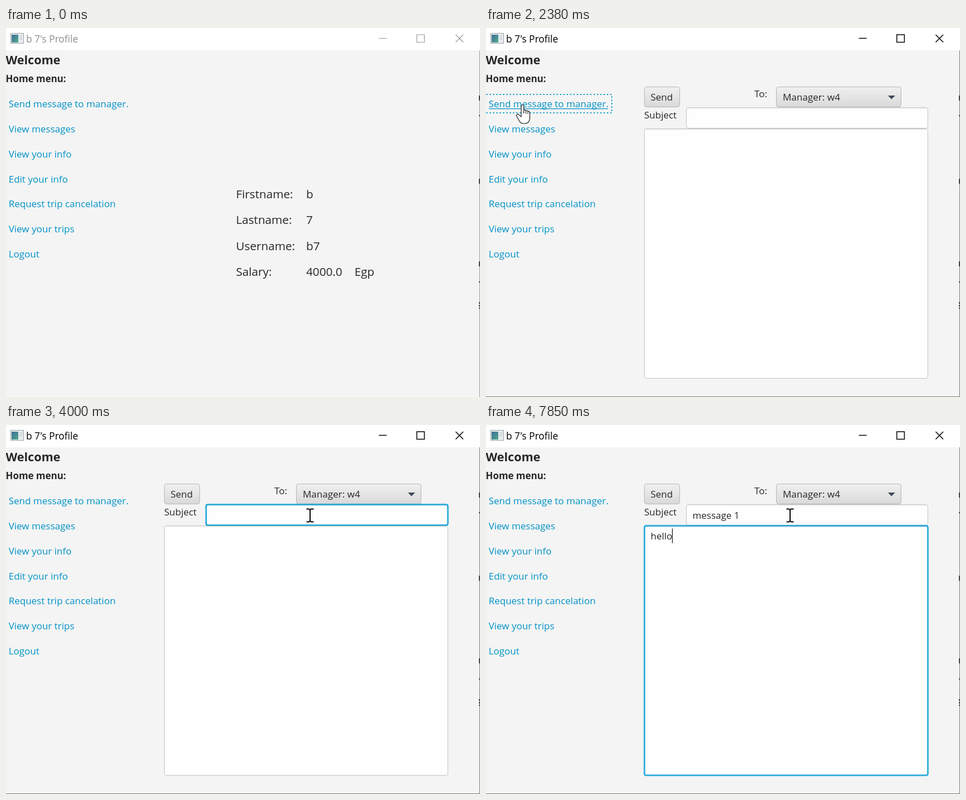
An HTML page that plays this animation: 848 px wide and 661 px high, repeating every 8000 ms.

```html
<!DOCTYPE html>
<html lang="en">
<head>
<meta charset="utf-8">
<title>Profile window</title>
<style>
  html, body { margin: 0; width: 100%; height: 100%; overflow: hidden; background: #f4f4f4; }
  svg { display: block; width: 848px; height: 661px; font: 17px "Open Sans", "Noto Sans", sans-serif; fill: #272727; }
  text { white-space: pre; }
  .bold { font-weight: 700; }
  #links { fill: #0092c6; }
  #info { font-size: 20.7px; }
  #controls { fill: none; stroke: #999; stroke-width: 1.2; }
  .active #controls { stroke: #000; stroke-width: 1.5; }
  #title { fill: #8f8f8f; }
  .active #title { fill: #000; }
  #side { stroke: #999; }
  #bottom { stroke: #fafafa; }
  .active :is(#side, #bottom) { stroke: #777; }
  .button { fill: url(#grey); stroke: #b4b4b4; }
  .button.hover { fill: url(#light); }
  .box { fill: #fefefe; stroke: #c3c3c3; }
  .ring { fill: none; stroke: #039ed3; }
  .glow { stroke-width: 5; opacity: .13; }
  .line { stroke-width: 2; }
  .cursor { fill: #fff; stroke: #222; stroke-width: 1.2; stroke-linejoin: round; }
</style>
</head>
<body>
<svg id="stage" viewBox="0 0 848 661">
  <defs>
    <linearGradient id="grey" x2="0" y2="1"><stop stop-color="#f0f0f0"/><stop offset="1" stop-color="#d9d9d9"/></linearGradient>
    <linearGradient id="light" x2="0" y2="1"><stop stop-color="#f5f5f5"/><stop offset="1" stop-color="#e5e5e5"/></linearGradient>
    <linearGradient id="teal" x2="1" y2="1"><stop stop-color="#3d6f9c"/><stop offset="1" stop-color="#4fa888"/></linearGradient>
    <path id="beamShape" d="M-6.5-11.5h4.5l2 1.5l2-1.5h4.5M-6.5 11.5h4.5l2-1.5l2 1.5h4.5M0-10V10"/>
  </defs>
  <rect width="848" height="661" fill="#f4f4f4"/>
  <rect width="848" height="40" fill="#fff"/>

  <rect x="8.5" y="9.5" width="23" height="18" fill="#e9edef" stroke="#9a9fa3"/>
  <rect x="10" y="12" width="12" height="14" fill="url(#teal)"/>
  <path d="M24 14h5M24 17h5M24 20h5" stroke="#b9c0c6"/>
  <text id="title" x="36" y="26" font-size="17.3">b 7's Profile</text>
  <path id="controls" d="M667 18.5h14M735 12h13.5v13.5h-13.5zM804.5 12l13.5 13.5M818 12l-13.5 13.5"/>

  <path id="bottom" d="M0 660.5H848"/>
  <path id="side" d="M847.5 40V661"/>
  <path d="M847 121v9M847 156v2M847 270v9M847 418v9M847 454v2M847 491v3M847 496v3M847 501v2" stroke="#444" stroke-width="2"/>

  <text class="bold" x="-.5" y="65" font-size="21.5">Welcome</text>
  <text class="bold" x="-.5" y="97" font-size="16.9">Home menu:</text>
  <g id="links"></g>
  <path id="underline" d="M5 144.6H218" stroke="#0092c6" stroke-width="1.2"/>
  <path id="dots" d="M0 119H225V152H0" fill="none" stroke="#0096c9" stroke-width="1.6" stroke-dasharray="3 3"/>

  <g id="info"></g>

  <g id="form">
    <rect class="button" x="283.5" y="105.5" width="63" height="36" rx="4"/>
    <text x="294.5" y="130">Send</text>
    <text x="480" y="124">To:</text>
    <rect id="combo" class="button" x="519.5" y="105.5" width="223" height="36" rx="4"/>
    <text x="531" y="130">Manager: w4</text>
    <path d="M719 121h13l-6.5 6.5z" fill="#3d4855"/>
    <text x="283" y="161.5">Subject</text>
    <rect class="box" x="358.5" y="142.5" width="432" height="37" rx="4"/>
    <path d="M361 143.5H788M361 144.5H788" stroke="#000" opacity=".05"/>
    <rect class="box" x="283.5" y="180.5" width="507" height="447" rx="3"/>
    <path d="M286 181.5H788M286 182.5H788" stroke="#000" opacity=".05"/>
    <g id="fieldFocus">
      <rect class="ring glow" x="358" y="142.5" width="432.5" height="37" rx="4"/>
      <rect class="ring line" x="358" y="142.5" width="432.5" height="37" rx="3"/>
    </g>
    <g id="areaFocus">
      <rect class="ring glow" x="283.5" y="180.5" width="507" height="447" rx="4"/>
      <rect class="ring line" x="283.5" y="180.5" width="507" height="447" rx="3"/>
    </g>
    <text id="subject" x="369.5" y="167.5"></text>
    <text id="body" x="294.5" y="205"></text>
    <rect id="caret" width="1.2" height="26" fill="#111"/>
  </g>

  <path id="arrow" class="cursor" d="M0 0V24L5.5 18.8L9 27.5L13 25.8L9.3 17.3H17Z"/>
  <g id="hand" class="cursor">
    <path d="M-2 1.8a2.3 2.3 0 0 1 4.6 0V9.5q2.2-1.3 3.8.6q2.4-.8 3.5 1q3.5-.4 3.5 3.2V22q0 11-9 11h-3q-5 0-8-6.5L-10 20q-1.5-2.5 1-3.5q2-.6 4 2L-2 21Z"/>
    <path fill="none" d="M2.6 9.5V15M6.4 10V15.5M9.9 11V16"/>
  </g>
  <g id="beam" fill="none">
    <use href="#beamShape" stroke="#fff" stroke-width="4"/>
    <use href="#beamShape" stroke="#000" stroke-width="2"/>
  </g>
</svg>
<script>
  const $ = id => document.getElementById(id);

  function addText(parent, x, y, text) {
    const el = document.createElementNS("http://www.w3.org/2000/svg", "text");
    el.setAttribute("x", x);
    el.setAttribute("y", y);
    el.textContent = text;
    $(parent).append(el);
    return el;
  }

  const links = ["Send message to manager.", "View messages", "View your info", "Edit your info",
    "Request trip cancelation", "View your trips", "Logout"]
    .map((text, i) => addText("links", 4.7, 142 + i * 44.85, text));

  [["Firstname:", "b"], ["Lastname:", "7"], ["Username:", "b7"], ["Salary:", "4000.0"]].forEach(([label, value], i) => {
    const y = 305 + i * 46.4;
    addText("info", 411.5, y, label);
    addText("info", 537, y, value);
  });
  addText("info", 623.5, 444.2, "Egp");

  // Each row: start time, then the value held until the next row.
  const pointer = [
    [600, 150, 170], [680, 128, 164], [760, 104, 156], [840, 84, 148], [910, 71, 142], [990, 65, 139], [1220, 65, 138],
    [2530, 84, 139], [2610, 140, 143], [2680, 225, 146], [2760, 322, 147], [2830, 410, 146], [2910, 478, 140],
    [2980, 511, 133], [3060, 530, 138], [3140, 541, 146], [3210, 548, 152], [3290, 551, 157],
    [3520, 548, 160], [3600, 544, 162]
  ];
  const subject = [
    [4530, "m"], [4610, "me"], [4920, "mes"], [5150, "mesa"], [5610, "mes"], [5690, "messa"],
    [5920, "messag"], [6150, "message"], [6380, "message "], [6610, "message 1"]
  ];
  const body = [[7300, "h"], [7380, "he"], [7530, "hel"], [7700, "hell"], [7850, "hello"]];

  const at = (rows, t) => rows.findLast(row => row[0] <= t);
  const show = (id, on) => { $(id).style.display = on ? "" : "none"; };
  const inside = (p, x1, y1, x2, y2) => !!p && p[1] >= x1 && p[1] <= x2 && p[2] >= y1 && p[2] <= y2;

  // Shows the text typed so far and returns its width.
  function type(id, rows, t) {
    const text = (at(rows, t) || [0, ""])[1];
    const el = $(id);
    if (el.textContent !== text) el.textContent = text;
    return text ? el.getComputedTextLength() : 0;
  }

  function draw(now) {
    const t = now % 8000;
    const p = at(pointer, t);
    const opened = t >= 2380;
    const pressed = t >= 2230 && !opened;
    const overLink = inside(p, 0, 118, 226, 152);
    const overField = opened && inside(p, 358, 142, 790, 180);
    const inField = t >= 3370 && t < 6840;
    const inArea = t >= 6840;

    $("stage").classList.toggle("active", t >= 2230);
    show("info", !opened);
    show("form", opened);

    links[0].style.fill = $("underline").style.stroke = pressed ? "#323232" : "";
    show("underline", overLink);
    show("dots", t >= 2230 && t < 3370);
    $("combo").classList.toggle("hover", opened && inside(p, 519, 105, 742, 142));

    show("fieldFocus", inField);
    show("areaFocus", inArea);
    const subjectWidth = type("subject", subject, t);
    const bodyWidth = type("body", body, t);
    show("caret", t >= 3520 && (t < 4000 || t >= 4530));
    $("caret").setAttribute("x", inArea ? 294 + bodyWidth : 369 + subjectWidth);
    $("caret").setAttribute("y", inArea ? 185.5 : 148);

    const shape = overLink ? "hand" : overField ? "beam" : "arrow";
    for (const id of ["hand", "beam", "arrow"]) {
      show(id, p && id === shape);
      if (p) $(id).setAttribute("transform", `translate(${p[1]} ${p[2]})`);
    }
    requestAnimationFrame(draw);
  }
  requestAnimationFrame(draw);
</script>
</body>
</html>
```
